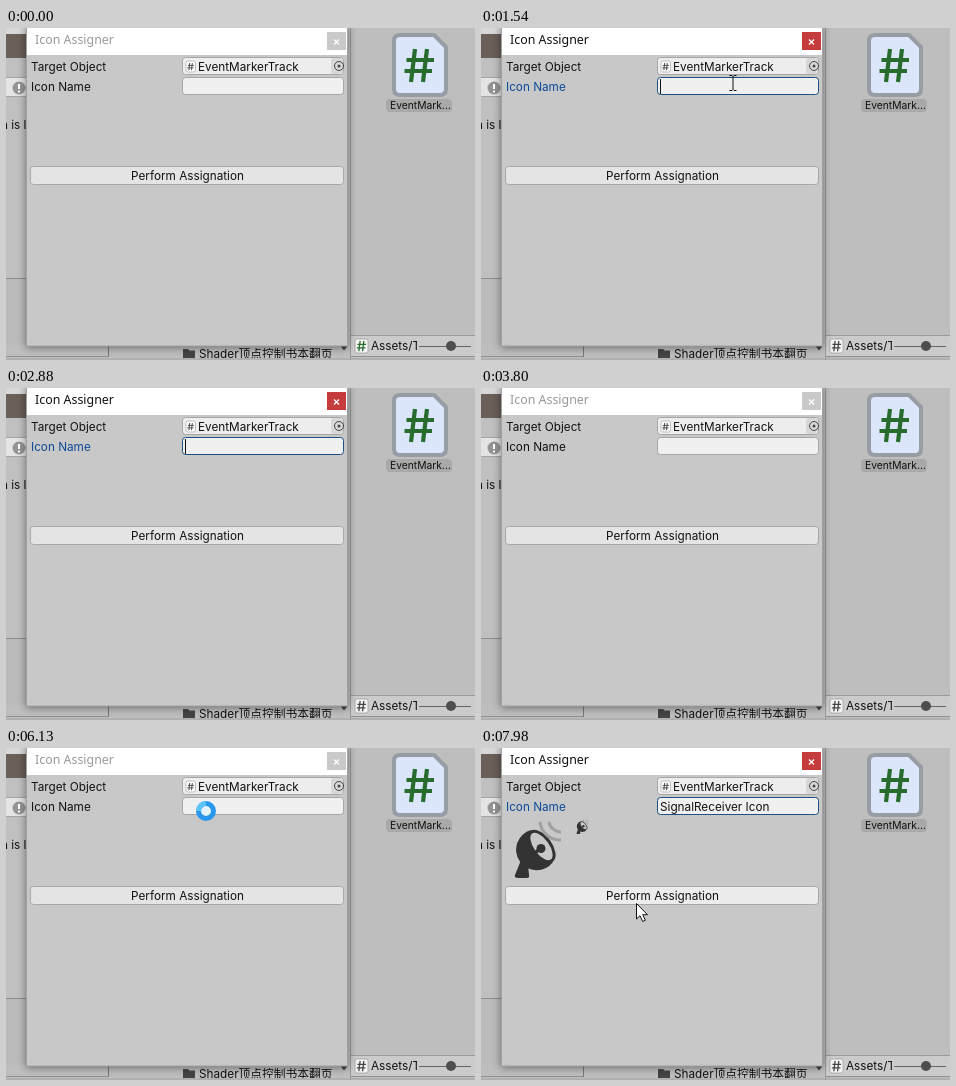
An HTML page for the animation above (8000 ms loop, 469 px wide and 332 px high).

```html
<!DOCTYPE html>
<html>
<head>
<meta charset="utf-8">
<style>
  html, body { margin: 0; width: 100%; height: 100%; overflow: hidden; }
  svg { display: block; width: 469px; height: 332px; font: 11.75px Inter, "Noto Sans CJK SC", "Noto Sans CJK", sans-serif; }
  #titleText { font: 12.4px "Noto Sans", sans-serif; }
  #frame { filter: drop-shadow(0 1px 4px rgba(0, 0, 0, .45)); }
</style>
</head>
<body>
<svg viewBox="0 0 469 332" fill="#111">
  <defs>
    <path id="hash" d="M10 0 6 33M22 0 18 33M1.500 11H29M-.5 22H27" fill="none" stroke-width="4.2"/>
    <g id="dish">
      <path d="M50 82A20.500 20.500 0 1 0 72 114Z M40 112 34 127Q33 130 37 130H46Q49 130 48 127L47 116Z" fill="#333"/>
      <ellipse cx="60.500" cy="98.500" rx="17.500" ry="9" transform="rotate(54 60.500 98.500)" fill="#c8c8c8" stroke="#333" stroke-width="3"/>
      <path d="M50 108 60 100" stroke="#333" stroke-width="3.500"/>
      <circle cx="60" cy="100.500" r="4.500" fill="#333"/>
      <path d="M68 74A12 12 0 0 0 80 84M59 74A20 20 0 0 0 80 92" fill="none" stroke="#a0a0a0" stroke-width="3"/>
    </g>
    <clipPath id="pathClip"><rect x="345" y="300" width="66" height="32"/></clipPath>
  </defs>

  <!-- editor behind the window -->
  <rect width="469" height="332" fill="#c0c0c0"/>
  <rect width="21" height="7" fill="#d8d8d8"/>
  <rect y="6" width="21" height="24" fill="#6b5f59"/>
  <rect x="-4" y="49.500" width="30" height="19" fill="#e4e4e4" stroke="#a5a5a5"/>
  <circle cx="13" cy="60" r="6.500" fill="#959595"/>
  <path d="M13 56V61M13 62.500V64.500" stroke="#fff" stroke-width="2"/>
  <text x="-5" y="101">n is lo</text>
  <path d="M0 250.500H21" stroke="#8c8c8c"/>
  <rect y="251" width="21" height="78" fill="#bbb"/>
  <rect y="317" width="345" height="12" fill="#bebebe"/>
  <path d="M102.500 317V329" stroke="#777"/>
  <path d="M177 321H182L183.500 322.500H189V330H177Z" fill="#444"/>
  <text x="193" y="330">Shader顶点控制书本翻页</text>
  <path d="M334.500 318H341.500L338 322.500Z" fill="#444"/>
  <path d="M0 328.500H102M345 328.500H469" stroke="#8f8f8f"/>
  <rect y="330" width="469" height="2" fill="#b0b0b0"/>
  <rect x="345" width="124" height="307" fill="#bebebe"/>
  <path d="M344.500 0V332" stroke="#9a9a9a"/>

  <!-- asset browser -->
  <path d="M393 7H428L440 19V61Q440 67 434 67H394Q388 67 388 61V13Q388 7 394 7Z" fill="#dbe6fa" stroke="#989da5" stroke-width="4" stroke-linejoin="round"/>
  <use href="#hash" x="399" y="21" stroke="#276c2d"/>
  <rect x="380" y="71" width="66" height="13" rx="4" fill="#a9a9a9"/>
  <text x="384" y="81" font-size="10.300">EventMark...</text>
  <rect x="345" y="307" width="124" height="21" fill="#cbcbcb"/>
  <path d="M345 307.500H469" stroke="#999"/>
  <rect x="349" y="311" width="13" height="14" rx="2" fill="#f4f4f4" stroke="#999" stroke-width=".7"/>
  <use id="footHash" href="#hash" transform="translate(351 313) scale(.31)"/>
  <text x="365" y="322" clip-path="url(#pathClip)">Assets/Tools</text>
  <path d="M413 318.500H465" stroke="#666"/>
  <circle cx="445" cy="318" r="5" fill="#4e4e4e"/>

  <!-- floating window -->
  <rect id="frame" x="20.500" y="-2" width="321" height="320" fill="#c8c8c8" stroke="#a0a0a0"/>
  <rect x="21" width="320" height="27" fill="#fff"/>
  <text id="titleText" x="29" y="16">Icon Assigner</text>
  <rect id="close" x="321" y="4" width="19" height="18"/>
  <path d="M328 11.500 333 16.500M333 11.500 328 16.500" stroke="#fff" stroke-width="1.300"/>
  <text x="25" y="43">Target Object</text>
  <rect x="176.500" y="29.500" width="161" height="17" rx="3" fill="#ededed" stroke="#a6a6a6"/>
  <rect x="325" y="30" width="12" height="16" rx="2" fill="#d8d8d8"/>
  <circle cx="333" cy="38" r="4.500" fill="none" stroke="#444"/>
  <circle cx="333" cy="38" r="1.500" fill="#444"/>
  <rect x="180" y="33" width="9.500" height="11" rx="2" fill="#fff" stroke="#aaa" stroke-width=".7"/>
  <use href="#hash" transform="translate(181.500 35) scale(.22)" stroke="#444"/>
  <text x="192" y="43">EventMarkerTrack</text>
  <text id="label" x="25" y="63">Icon Name</text>
  <rect id="field" x="176.500" y="49.500" width="161" height="17" rx="3" fill="#f0f0f0"/>
  <text id="value" x="179" y="63">SignalReceiver Icon</text>
  <path id="caret" d="M0 51V66" stroke="#111"/>
  <rect id="button" x="24.500" y="138.500" width="313" height="18" rx="3" stroke="#a8a8a8"/>
  <text x="125" y="152">Perform Assignation</text>
  <g id="preview">
    <use href="#dish"/>
    <use href="#dish" transform="translate(86.500 51.500) scale(.265)"/>
  </g>

  <g id="pointer">
    <path id="arrow" d="M.5 .5V16L4 12.700 6.700 18.500 9.300 17.300 6.700 11.700H11.500Z" fill="#fff" stroke="#111"/>
    <path id="beam" d="M-3.500-7.500H-1L0-6.500 1-7.500H3.500M0-6.500V6.500M-3.500 7.500H-1L0 6.500 1 7.500H3.500" fill="none" stroke="#111"/>
    <g id="busy" fill="none">
      <circle id="halo" r="11" fill="#efe95c"/>
      <circle id="ring" r="7.500" fill="#e6f2fa" stroke-width="5"/>
      <path id="glint" d="M-7.500 0A7.500 7.500 0 0 1 0-7.500" stroke="#5cc4f8" stroke-width="5"/>
    </g>
  </g>
</svg>
<script>
const LOOP = 8000;
const $ = id => document.getElementById(id);
const set = (id, name, value) => $(id).setAttribute(name, value);
const show = (id, on) => set(id, 'visibility', on ? 'inherit' : 'hidden');

// pointer visits: time, x, y
const visits = [
  [[100, 205, 210], [560, 249, 52], [690, 249, 52], [800, 252, 53], [1500, 252, 53], [1540, 252, 55],
   [1760, 252, 55], [1920, 267, 73], [2130, 243, 62], [2300, 254, 64], [2490, 252, 64],
   [2800, 252, 64], [2850, 109, 151], [2880, 109, 151]],
  [[5680, 125, 200], [6130, 200, 63], [6250, 210, 58], [6880, 210, 58], [6960, 212, 63],
   [7530, 212, 63], [7600, 217, 72], [7790, 51, 112], [7970, 155, 155], [8000, 155, 155]]
];

function pointerAt(t) {
  const path = visits.find(v => t >= v[0][0] && t < v.at(-1)[0]);
  if (!path) return null;
  const i = path.findIndex(p => p[0] > t);
  const [t0, x0, y0] = path[i - 1], [t1, x1, y1] = path[i];
  const u = (t - t0) / (t1 - t0), k = u * u * (3 - 2 * u);
  return [x0 + (x1 - x0) * k, y0 + (y1 - y0) * k];
}

function draw(t) {
  const active = t >= 690 && t < 3800 || t >= 6210;
  const pressed = t >= 580 && t < 690 || t >= 6165 && t < 6210;
  const filled = t >= 6600;
  const pos = pointerAt(t);
  const overButton = active && pos && pos[1] > 138 && pos[1] < 157;

  set('titleText', 'fill', active ? '#111' : '#999');
  set('close', 'fill', active ? '#c43c3c' : '#c9c9c9');
  set('label', 'fill', active ? '#0c4a98' : '#111');
  set('field', 'stroke', active ? '#1d5087' : pressed ? '#666' : '#a6a6a6');
  set('button', 'fill', overButton ? '#ececec' : '#e4e4e4');
  set('footHash', 'stroke', t < 690 ? '#276c2d' : '#444');
  show('value', filled);
  show('caret', active && t < 7160);
  set('caret', 'transform', `translate(${filled ? 291.5 : 179.5} 0)`);
  show('preview', t >= 7160);

  show('pointer', pos);
  if (!pos) return;
  const overField = pos[1] < 67;
  set('pointer', 'transform', `translate(${pos})`);
  show('arrow', active && !overField);
  show('beam', active && overField);
  show('busy', !active);
  show('halo', !active && pressed);
  show('glint', !active && !pressed);
  set('ring', 'stroke', pressed ? '#70b45c' : '#2997ee');
  set('ring', 'fill', pressed ? '#f5f078' : '#e6f2fa');
  set('glint', 'transform', `rotate(${(t - 6130) * 0.36})`);
}

function tick() {
  draw(performance.now() % LOOP);
  requestAnimationFrame(tick);
}
tick();
</script>
</body>
</html>
```
